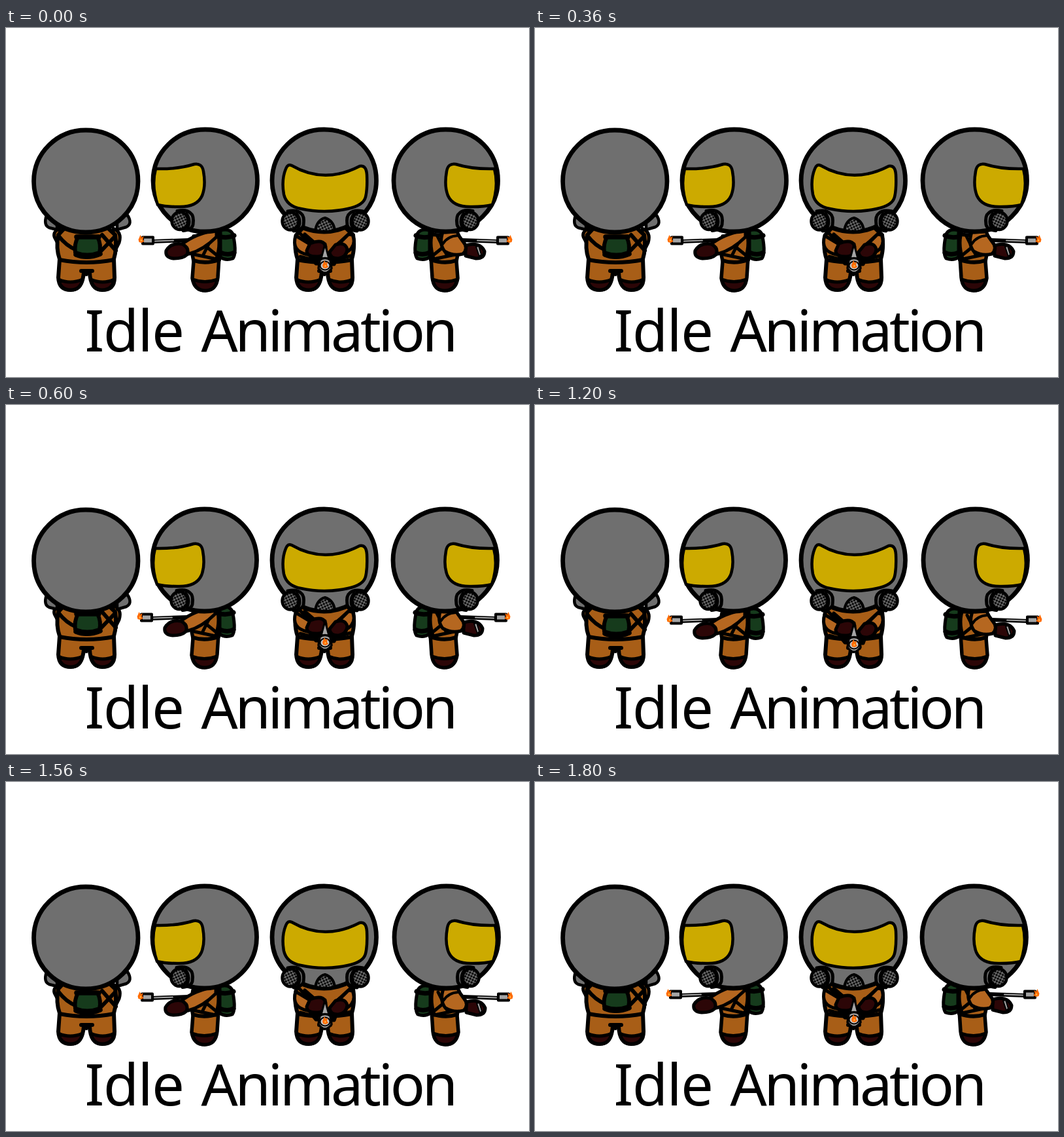
Animation, 800 px wide and 533 px high, one loop 2400 ms. Source, as an HTML page:

```html
<!DOCTYPE html>
<html lang="en">
<head>
<meta charset="utf-8">
<title>Idle Animation</title>
<style>
html, body { margin: 0; height: 100%; overflow: hidden; background: #fff; }
svg { display: block; width: 100%; height: 100%; }
.ink { stroke: #000; stroke-width: 5; stroke-linejoin: round; stroke-linecap: round; }
.line { fill: none; }
.suit { fill: #a85e17; }
.sleeve { fill: #b56720; }
.dark { fill: #2c0607; }
.grey { fill: #6f6f6f; }
.steel { fill: #a5a5a5; }
.visor { fill: #ccaa00; }
.pack { fill: #163b1c; }
.thin { stroke-width: 3.5; }
text { font: 88px "Noto Sans", sans-serif; }
</style>
</head>
<body>
<svg viewBox="0 0 800 533">
<defs>
  <pattern id="holes" width="6" height="6" patternUnits="userSpaceOnUse" patternTransform="rotate(20)">
    <rect width="6" height="6" fill="#686868"/>
    <circle cx="1.5" cy="1.5" r="1.6"/><circle cx="4.5" cy="4.5" r="1.6"/>
  </pattern>

  <g id="shell" class="ink grey">
    <path d="M0 -78C48 -78 80 -43 80 0C80 43 44 78 0 78C-44 78 -79.500 44 -79.500 0C-79.500 -43 -44 -78 0 -78Z" stroke-width="6.800"/>
  </g>

  <g id="filter" class="ink">
    <path class="grey" d="M-4 -15Q10 -18 16 -12Q22 -8 20 6Q18 14 5 15Z"/>
    <path class="line thin" d="M10 -12Q19 0 11 13"/>
    <ellipse rx="12.5" ry="13.5" fill="url(#holes)" stroke-width="4.5"/>
  </g>

  <g id="flame">
    <path fill="#ff6a00" d="M-1 -6L1 -2L4 -4L3 1L5 4L1 6L-3 5L-4 1L-3 -1Z"/>
    <path fill="#ffc04a" d="M0 0L2 3L-1 4Z"/>
  </g>

  <g id="trunk" class="ink">
    <path class="suit" d="M95 300L80 316Q76 336 82 353L80 381Q81 400 99 400Q117 400 119 373H128Q129 400 147 400Q166 400 166 381L165 353Q170 336 167 316L150 300Z" stroke-width="6"/>
    <path class="dark" d="M80.500 384Q98 392 117 384Q114 400 99 400Q83 400 80.500 384ZM130 384Q148 392 165.500 384Q163 400 147 400Q133 400 130 384Z"/>
    <path class="line" d="M82 354Q123 362 165 354M115 371H132M123 371V376" stroke-width="6"/>
  </g>

  <g id="sideBody" class="ink">
    <path class="suit" d="M287 318Q282 338 287 356L285 382Q288 401 305 401Q322 400 324 381L326 350L330 315Z" stroke-width="5.500"/>
    <path class="dark" d="M286 384Q304 391 323 384Q321 401 305 401Q289 401 286 384Z"/>
    <path class="line" d="M287 355Q305 361 326 354" stroke-width="6"/>
  </g>

  <g id="sidePack" class="ink">
    <path class="pack" d="M328 309Q346 305 348 319Q353 344 347 352Q336 356 328 350Z"/>
    <path class="line" d="M329 319Q340 321 349 317M328 343Q340 348 349 343" stroke-width="7"/>
    <path class="line" d="M322 308Q330 326 322 352M304 332L325 349M289 346L322 353M316 318L302 346"/>
  </g>

  <g id="lance" class="ink">
    <path class="line" d="M224 326L280 324" stroke-width="6"/>
    <path d="M228 325.500L256 324.500" style="stroke:#a5a5a5;stroke-width:2"/>
    <rect class="steel" x="209" y="319.500" width="16" height="10" stroke-width="4"/>
    <use href="#flame" x="206.500" y="322" stroke="none"/>
  </g>

  <g id="sideHead" class="ink">
    <path class="visor" d="M229 215Q262 216 288 208Q300 206 302 219Q306 241 300 256Q292 274 263 273Q244 273 232 270Q222 241 229 215Z" stroke-width="4.500"/>
    <use href="#filter" x="266" y="294.500"/>
  </g>
</defs>

<!-- back view -->
<g class="ink" data-move="pack">
  <path class="suit" d="M82 306Q70 312 75 321L84 338ZM164 306Q178 312 173 328L164 346Z"/>
</g>
<use href="#trunk"/>
<g class="ink" data-move="pack">
  <path class="line" d="M80 317Q92 333 108 339M147 316L168 340M166 319L143 343" stroke-width="6"/>
  <path class="pack" d="M110 319H140Q146 331 143 343Q124 350 106 343Q104 331 110 319Z" stroke-width="6"/>
  <path class="line" d="M108 319H142M107 346Q124 353 144 345" stroke-width="7.500"/>
</g>
<g class="ink" data-move="head">
  <path class="grey" d="M62 286Q57 301 66 305L78 308V288ZM186 286Q194 299 184 304L170 308V288Z" stroke-width="4.500"/>
  <use href="#shell" x="122" y="234"/>
</g>

<!-- left view -->
<g data-move="left">
  <use href="#sideBody"/>
  <g data-move="pack"><use href="#sidePack"/></g>
  <g class="ink" data-move="lance">
    <use href="#lance"/>
    <path class="sleeve" d="M322 309Q291 313 268 331L280 345Q302 339 322 319Z"/>
    <path class="dark" d="M270 330Q253 327 245 340Q243 351 257 352Q271 352 277 346Q281 336 270 330Z"/>
  </g>
  <g data-move="head">
    <use href="#shell" x="304.500" y="233"/>
    <use href="#sideHead"/>
  </g>
</g>

<!-- front view -->
<use href="#trunk" x="364"/>
<g class="ink" data-move="hands">
  <path class="line" d="M449 313Q466 332 488 330M527 312L505 332M457 315L472 328M450 349Q487 361 527 348M446 330L464 345M530 328L518 343"/>
  <path class="sleeve" d="M443 317Q436 341 461 346L468 332Z"/>
  <path class="sleeve" d="M530 316Q538 334 518 344L509 330L524 315Z"/>
  <path d="M466 350L506 350L502 361L474 360Z"/>
  <path class="dark" d="M465 329Q486 321 489 334Q490 348 477 349Q460 350 460 340Z"/>
  <path class="dark" d="M504 331Q519 326 522 338Q521 350 508 352Q495 352 495 342Z"/>
  <path class="steel" d="M488 330L482 352H494Z" stroke-width="3"/>
  <path class="steel" d="M480 354Q488 349 496 354L498 367Q493 374 488 374Q483 374 478 367Z" stroke-width="3.500"/>
  <ellipse cx="488" cy="363" rx="7.500" ry="6.500" fill="#c4c4c4" stroke-width="2"/>
  <use href="#flame" x="488" y="361" stroke="none"/>
</g>
<g class="ink" data-move="head">
  <use href="#shell" x="486.500" y="233"/>
  <path class="visor" d="M437 210Q487 239 541 211Q551 209 552 224Q553 246 550 258Q547 271 523 276Q487 284 451 276Q429 272 425 254Q421 232 428 215Q431 207 437 210Z" stroke-width="4.500"/>
  <path fill="url(#holes)" d="M473 309Q476 293 488 290Q501 294 503 309Q488 313 473 309Z" stroke-width="4"/>
  <use href="#filter" x="435" y="295"/>
  <use href="#filter" transform="translate(542 295) scale(-1 1)"/>
</g>

<!-- right view -->
<g data-move="right">
  <g transform="translate(976)scale(-1 1)">
    <use href="#sideBody"/>
    <g data-move="pack"><use href="#sidePack"/></g>
  </g>
  <g class="ink" data-move="lanceRight">
    <use href="#lance" transform="translate(977)scale(-1 1)"/>
    <path class="dark" d="M703 332Q725 326 732 341Q732 352 719 352L703 348Z"/>
    <path class="steel" d="M719 334L724 349L727 346L723 333Z" stroke-width="2"/>
    <path class="sleeve" d="M668 312Q662 330 671 341Q684 349 699 345Q708 336 699 326Q693 319 690 311Z"/>
    <path class="line" d="M668 330Q675 318 691 317" stroke-width="4"/>
  </g>
  <g data-move="head">
    <use href="#shell" x="672.500" y="233"/>
    <use href="#sideHead" transform="translate(976)scale(-1 1)"/>
  </g>
</g>

<text x="120.500" y="493.500" letter-spacing="-1.300">Idle</text>
<text x="298.500" y="493.500" letter-spacing="-4.300">Animation</text>
</svg>
<script>
// Offsets for the rest, dip and low poses.
const poses = {
  head: [[0, 0], [0, 4], [0, 4]],
  pack: [[0, 0], [0, 0], [0, 3]],
  hands: [[0, 0], [0, 0], [0, 3]],
  left: [[0, 0], [-1, 0], [-1, 0]],
  right: [[0, 0], [-1, 0], [1, 0]],
  lance: [[0, 0], [-1, 0], [0, 4]],
  lanceRight: [[0, 0], [-2, 0], [0, 4]]
};
const sequence = [0, 1, 2, 1];
const parts = document.querySelectorAll("[data-move]");

function draw(now) {
  const pose = sequence[Math.floor(now / 600) % 4];
  for (const part of parts) {
    part.setAttribute("transform", `translate(${poses[part.dataset.move][pose]})`);
  }
  requestAnimationFrame(() => draw(performance.now() - start));
}
const start = performance.now();
draw(0);
</script>
</body>
</html>
```
